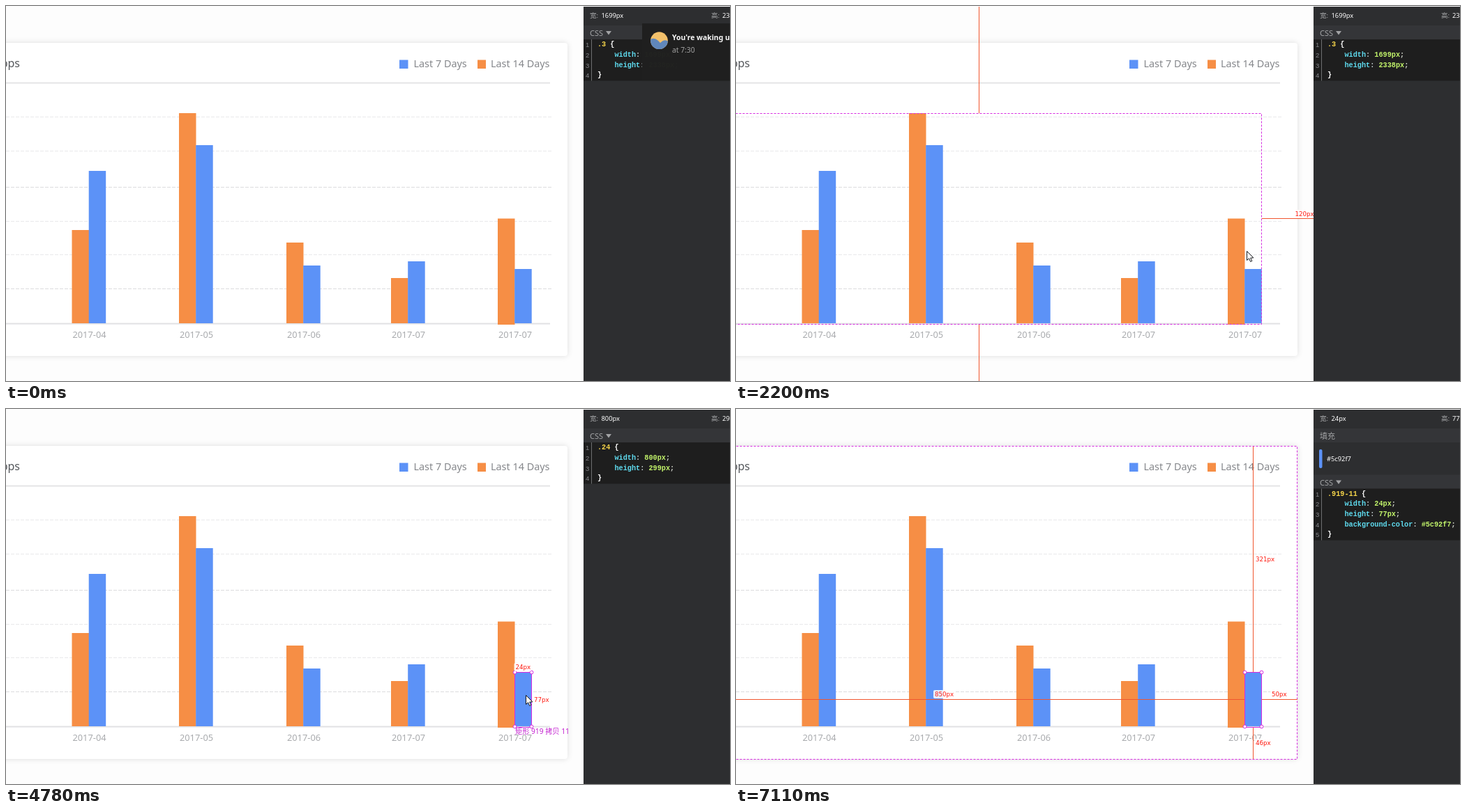
These frames come from a looping animation (1038 px wide and 539 px high, 7.57 s). An HTML page with a canvas:

```html
<!DOCTYPE html>
<html lang="en">
<head>
<meta charset="utf-8">
<title>Chart inspection</title>
<style>
html, body { margin: 0; width: 100%; height: 100%; overflow: hidden; background: #fdfdfd; }
canvas { display: block; }
</style>
</head>
<body>
<canvas id="stage" width="1038" height="539"></canvas>
<script>
const ctx = document.getElementById('stage').getContext('2d');
const W = 1038, H = 539, LOOP = 7570;
const BLUE = '#5c92f7', ORANGE = '#f68e45', PINK = '#d62be0', RED = '#f0562f';
const SANS = '"Noto Sans", "Noto Sans CJK SC", "Noto Sans CJK", sans-serif';
const MONO = '"Liberation Mono", monospace';
const LABEL = '"DejaVu Sans", sans-serif';

const GROUP = [-46, 154, 754, 457];
const BAR = [729, 378, 754, 457];
const CARD = [-150, 53, 805, 503];

// left, top of orange, top of blue, date
const BARS = [
  [94.5, 322, 237, '2017-04'],
  [248, 154, 200, '2017-05'],
  [402, 340, 373, '2017-06'],
  [552, 391, 367, '2017-07'],
  [705, 305.5, 378, '2017-07']
];

const PANELS = [
  { w: '1699px', h: '23', name: '.3', css: [['width', '1699px'], ['height', '2338px']] },
  { w: '800px', h: '29', name: '.24', css: [['width', '800px'], ['height', '299px']] },
  { w: '24px', h: '77', name: '.919-11', fill: '#5c92f7',
    css: [['width', '24px'], ['height', '77px'], ['background-color', '#5c92f7']] }
];

function rect(x, y, w, h, color) {
  ctx.fillStyle = color;
  ctx.fillRect(x, y, w, h);
}

function text(str, x, y, size, color, opt = {}) {
  ctx.font = `${opt.weight || 400} ${size}px ${opt.font || SANS}`;
  ctx.textAlign = opt.align || 'left';
  ctx.fillStyle = color;
  ctx.fillText(str, x, y);
}

function line(x1, y1, x2, y2, color, width = 1, dash = []) {
  ctx.strokeStyle = color;
  ctx.lineWidth = width;
  ctx.setLineDash(dash);
  ctx.beginPath();
  ctx.moveTo(x1, y1);
  ctx.lineTo(x2, y2);
  ctx.stroke();
  ctx.setLineDash([]);
}

function outline([l, t, r, b], dashed) {
  ctx.strokeStyle = PINK;
  ctx.lineWidth = 1;
  ctx.setLineDash(dashed ? [3, 2] : []);
  ctx.strokeRect(l + .5, t + .5, r - l - 1, b - t);
  ctx.setLineDash([]);
}

function select(box) {
  outline(box);
  const [l, t, r, b] = box;
  for (const x of [l + .5, r - .5]) for (const y of [t + .5, b - .5]) {
    ctx.beginPath();
    ctx.arc(x, y, 2.4, 0, 7);
    ctx.fillStyle = '#fff';
    ctx.fill();
    ctx.stroke();
  }
}

function measure(str, x, y) {
  ctx.font = `8.7px ${LABEL}`;
  const w = ctx.measureText(str).width;
  ctx.beginPath();
  ctx.roundRect(x - 2, y - 6, w + 3, 12, 2);
  ctx.fillStyle = 'rgba(255,255,255,.85)';
  ctx.fill();
  text(str, x, y + 3.2, 8.7, '#ff1a10', { font: LABEL });
}

function drawChart() {
  rect(0, 0, W, H, '#fdfdfd');
  ctx.save();
  ctx.shadowColor = 'rgba(0,0,0,.13)';
  ctx.shadowBlur = 8;
  ctx.fillStyle = '#fff';
  ctx.beginPath();
  ctx.roundRect(-50, 53, 855, 450, 4);
  ctx.fill();
  ctx.restore();

  text('Apps', 20, 88, 16, '#55585c', { align: 'right' });
  rect(564, 77.5, 12.5, 12.5, BLUE);
  text('Last 7 Days', 584.5, 88, 14.4, '#85878b');
  rect(676, 77.5, 12, 12.5, ORANGE);
  text('Last 14 Days', 695, 88, 14.4, '#85878b');
  rect(0, 109.8, 780, 1.6, '#dfdfe1');

  [159, 208, 260, 309, 357, 406].forEach((y, i) =>
    line(0, y + .5, 782, y + .5, i === 2 || i === 5 ? '#dcdcde' : '#e9e9eb', 1, [5, 2]));
  rect(0, 455.6, 780, 2, '#e2e2e4');

  BARS.forEach(([x, orange, blue, date], i) => {
    rect(x, orange, 24.5, (i === 4 ? 458 : 456) - orange, ORANGE);
    rect(x + 24.2, blue, 24.5, 456 - blue, BLUE);
    text(date, x + 25, 476.5, 12.8, '#a9abae', { align: 'center' });
  });
}

function bar(label, y) {
  rect(828, y, 210, 20, '#343538');
  text(label, 837, y + 15, 11, '#a3a4a6');
}

function drawPanel({ w, h, name, fill, css }) {
  rect(828, 1, 210, 538, '#2d2e30');
  text('宽:', 837, 16.5, 9.6, '#a3a4a6');
  text(w, 853.5, 16.5, 9.3, '#fff', { weight: 500 });
  text('高:', 1011, 16.5, 9.6, '#a3a4a6');
  text(h, 1027, 16.5, 9.3, '#fff', { weight: 500 });

  let y = 28;
  if (fill) {
    bar('填充', y);
    ctx.beginPath();
    ctx.roundRect(836, 58, 4.5, 27, 2);
    ctx.fillStyle = fill;
    ctx.fill();
    text(fill, 847, 75.3, 9.3, '#fff', { weight: 500 });
    y = 94.5;
  }
  bar('CSS', y);
  ctx.fillStyle = '#a3a4a6';
  ctx.beginPath();
  ctx.moveTo(860, y + 8);
  ctx.lineTo(868, y + 8);
  ctx.lineTo(864, y + 13.5);
  ctx.fill();

  const top = y + 20, rows = css.length + 2;
  rect(828, top, 210, rows * 14.7 + .7, '#1e1e1e');
  rect(839, top, 1, rows * 14.7 + .7, '#6d6e70');
  const base = i => top + 10.2 + i * 14.65;
  const code = (str, col, row, color) =>
    text(str, 848 + col * 6.12, base(row), 10.2, color, { font: MONO, weight: 700 });

  for (let i = 0; i < rows; i++)
    text(i + 1, 831, base(i) + 1, 9.5, '#85868a', { font: '"Liberation Sans", sans-serif' });
  code(name, 0, 0, '#f7d64a');
  code('{', name.length + 1, 0, '#fff');
  css.forEach(([prop, value], i) => {
    const col = 4 + prop.length;
    code(prop, 4, i + 1, '#5fdcf0');
    code(':', col, i + 1, '#c9d3d6');
    code(value, col + 2, i + 1, '#c3f56b');
    code(';', col + 2 + value.length, i + 1, '#d8dcd2');
  });
  code('}', 0, rows - 1, '#fff');
}

function drawNotice(alpha) {
  if (alpha <= 0) return;
  ctx.save();
  ctx.globalAlpha = alpha;
  rect(912, 25, 126, 82, '#1f1f1f');
  ctx.beginPath();
  ctx.arc(936.5, 49.7, 12.4, 0, 7);
  ctx.fillStyle = '#f7c46c';
  ctx.fill();
  ctx.clip();
  ctx.fillStyle = '#5d86bd';
  ctx.beginPath();
  ctx.moveTo(922, 50);
  ctx.bezierCurveTo(929, 43, 934, 49, 938, 53);
  ctx.bezierCurveTo(942, 49, 945, 48, 950, 51);
  ctx.lineTo(950, 64);
  ctx.lineTo(922, 64);
  ctx.fill();
  ctx.restore();
  ctx.save();
  ctx.globalAlpha = alpha;
  text("You're waking up", 955, 49.2, 10.4, '#fff', { weight: 600 });
  text('at 7:30', 955, 66.7, 10.3, '#a5a5a5');
  ctx.restore();
}

function drawCursor([x, y]) {
  const shape = [[0, 0], [0, 13], [3, 10.3], [5.2, 15], [7.3, 14], [5.2, 9.6], [9.4, 9.4]];
  ctx.beginPath();
  shape.forEach(([dx, dy]) => ctx.lineTo(x + dx + .5, y + dy + .5));
  ctx.closePath();
  ctx.fillStyle = '#fff';
  ctx.fill();
  ctx.strokeStyle = '#16181c';
  ctx.lineWidth = 1;
  ctx.stroke();
}

function stepped(t, start, end, count) {
  const k = Math.floor((t - start) / ((end - start) / (count - 1)) + .01);
  return Math.max(0, Math.min(1, (k + 1) / count));
}

const mix = (a, b, p) => [a[0] + (b[0] - a[0]) * p, a[1] + (b[1] - a[1]) * p];
const easeOut = p => 1 - (1 - p) * (1 - p);

function cursorAt(t) {
  if (t < 1290 || t >= 7110) return null;
  if (t < 2980) return mix([905, 369], [732, 352], easeOut(stepped(t, 1290, 1970, 10)));
  if (t < 3620) {
    const p = stepped(t, 2980, 3440, 7);
    return p <= 4 / 7 ? mix([732, 352], [731, 396], p * 7 / 4)
                      : mix([731, 396], [730, 409], (p * 7 - 4) / 3);
  }
  if (t < 6490) return mix([730, 409], [745, 411], stepped(t, 3620, 3940, 5));
  return mix([745, 411], [1010, 542], stepped(t, 6490, 7110, 9));
}

function drawGuides(t) {
  if (t < 2200) return;
  if (t < 2370) {
    line(348.5, 1, 348.5, 154, RED);
    line(348.5, 458, 348.5, H, RED);
    line(754, 305.5, 828, 305.5, RED);
    outline(GROUP, true);
    measure('120px', 801.5, 299);
    return;
  }
  const onBar = t >= 3130 && t < 6490;
  if (t < 4620) {
    if (onBar) outline(BAR, true);
    select(GROUP);
    if (!onBar) {
      measure('800px', 340, 147);
      measure('299px', 757, 306);
    }
  } else {
    select(BAR);
    if (onBar) {
      measure('24px', 730.5, 371);
      measure('77px', 757, 418);
    } else {
      outline(CARD, true);
      line(741.5, 54, 741.5, 378, RED);
      line(741.5, 458, 741.5, 503, RED);
      line(0, 417.5, 729, 417.5, RED);
      line(754, 417.5, 805, 417.5, RED);
      measure('321px', 745, 216);
      measure('46px', 745, 480);
      measure('850px', 285, 410);
      measure('50px', 768, 410);
    }
  }
  if (onBar) text('矩形 919 拷贝 11', 730, 467.3, 10.2, '#c322d0');
}

function noticeAlpha(t) {
  if (t < 520) return .98;
  if (t >= 1120) return 0;
  return .55 * Math.pow(.46, Math.floor((t - 520) / 73));
}

function draw(t) {
  drawChart();
  drawGuides(t);
  drawPanel(PANELS[t < 2600 ? 0 : t < 4930 ? 1 : 2]);
  drawNotice(noticeAlpha(t));
  const cursor = cursorAt(t);
  if (cursor) drawCursor(cursor);
}

const begin = performance.now();
function frame() {
  draw((performance.now() - begin) % LOOP);
  requestAnimationFrame(frame);
}
frame();
</script>
</body>
</html>
```
